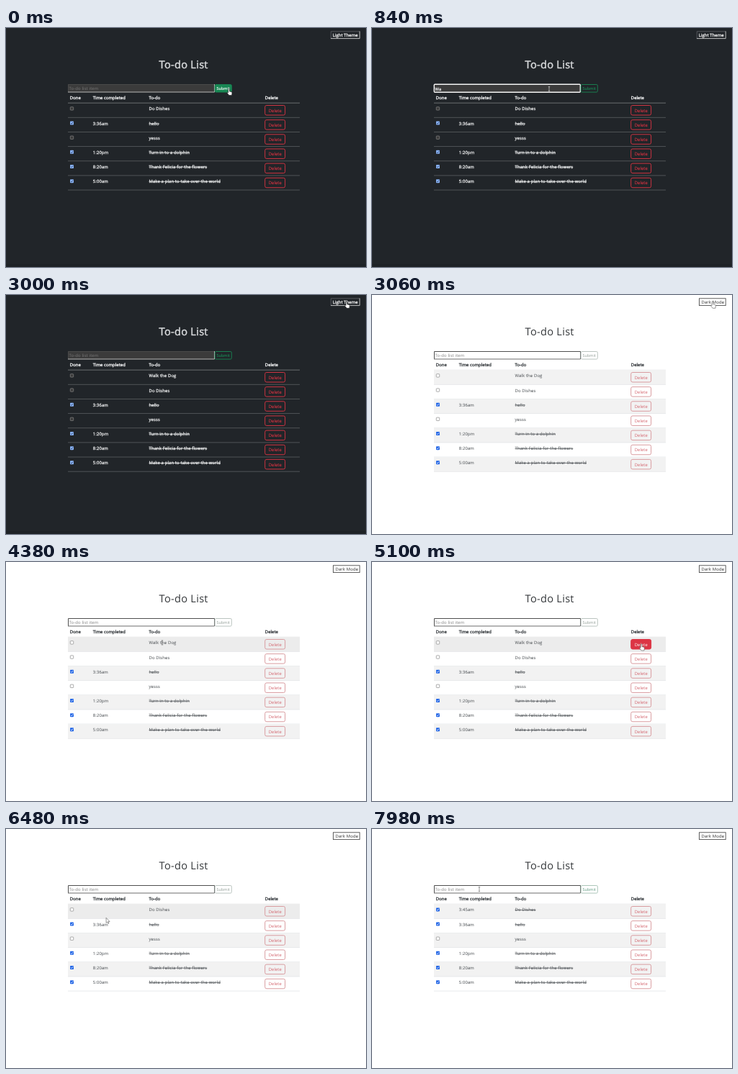
An HTML page for the animation above (8 s loop, 500 px wide and 332 px high).

```html
<!DOCTYPE html>
<html lang="en">
<head>
<meta charset="utf-8">
<title>To-do List</title>
<style>
  html, body { margin: 0; width: 100%; height: 100%; overflow: hidden; }
  svg { display: block; width: 500px; height: 332px; }
  text {
    font: 5.86px "Open Sans", "Noto Sans", sans-serif;
    letter-spacing: .15px;
    text-rendering: geometricPrecision;
    fill: var(--text);
    stroke: var(--text);
    stroke-width: var(--weight);
    white-space: pre;
  }
  .dark {
    --bg: #212529; --foot: #1e2226; --text: #e2e3e4; --head: #f0f1f2; --title: #d9dbdd;
    --line: #54585b; --rule: #707376; --weight: .3px; --thin: .15px;
    --field: #3b3b3b; --edge: #4a4a4a; --edge2: #b4b4b4; --hint: #767676;
    --box: #3b3b3b; --boxedge: #868686; --tick: #8ab4f8; --mark: #22324d;
    --red: #cc3341; --redtext: #cc3341; --green: #198754; --greentext: #198754;
    --theme: #f4f4f4; --beam: #d8d8d8; --outline: #15181a;
  }
  .light {
    --bg: #fff; --foot: #fff; --text: #53575b; --head: #3c4044; --title: #35383b;
    --line: #e6e8ea; --rule: #e6e8ea; --weight: .05px; --thin: 0px;
    --field: #fff; --edge: #505050; --edge2: #6c6c6c; --hint: #808080;
    --box: #fff; --boxedge: #8c8c8c; --tick: #2467e6; --mark: #fff;
    --red: #d99ca0; --redtext: #d3646d; --green: #b3beb8; --greentext: #8d9a93;
    --theme: #444; --beam: #666; --outline: #555;
  }
  .light.tinted { --green: #a3c0b1; --greentext: #559479; }
  .title { font-size: 14.6px; letter-spacing: .27px; fill: var(--title); stroke: none; }
  .dark .title { stroke: var(--title); stroke-width: .45px; }
  .head { fill: var(--head); stroke: var(--head); stroke-width: .35px; letter-spacing: .08px; }
  .hint { fill: var(--hint); stroke: none; }
  .theme { fill: var(--theme); stroke: var(--theme); }
  .dark .theme { letter-spacing: .1px; }
  .del { fill: var(--redtext); stroke: var(--redtext); stroke-width: var(--thin); letter-spacing: .05px; }
  .sub {
    fill: var(--greentext); stroke: var(--greentext); stroke-width: var(--thin);
    font-size: 5.4px; letter-spacing: .1px;
  }
  .on { fill: #fff; stroke: #fff; }
  .strike { stroke: var(--text); stroke-width: .75; }
</style>
</head>
<body>
<svg id="stage" viewBox="0 0 500 332"><g id="page"></g><path id="cursor"/></svg>
<script>
const stage = document.getElementById('stage');
const page = document.getElementById('page');
const cursor = document.getElementById('cursor');

const LOOP = 8000, STEP = 60;
const FOCUS = 660, ADD = 2340, LIGHT = 3060, REMOVE = 5220, CHECK = 6960, TINT = 7740;
const TOP = 104.4, ROW = 20.15;

const ITEM = 'Walk the Dog';
const KEYS = [720, 780, 960, 1020, 1080, 1080, 1140, 1200, 1500, 1560, 1680, 1740];

// time, x, y
const PATH = [
  [0, 309.6, 84.5], [60, 309.6, 84.5], [240, 348, 150], [420, 335, 200], [660, 246, 84.6],
  [2040, 246, 84.6], [2280, 302, 83], [2400, 302, 83], [2760, 462, 25], [2880, 473, 9.3],
  [3120, 473, 9.3], [3600, 350, 113], [3900, 76, 112], [4200, 217, 112], [4380, 217, 112],
  [5040, 374, 114], [5220, 374, 114], [5640, 324.5, 112.5], [6000, 250, 114],
  [6300, 170, 130], [6720, 91.5, 113], [7020, 91.5, 113], [7320, 368, 111],
  [7740, 302, 83], [7980, 149, 83.7], [8000, 149, 83.7]
];

const SHAPES = {
  arrow: 'M0 0V7.2L1.7 5.7 2.8 8.2 3.9 7.7 2.8 5.3H5Z',
  hand: 'M-.9.7a.9.9 0 0 1 1.8 0V3.6l2.6.6q1 .3.9 1.3L4 9H.2L-2.2 6q-.6-1.2.5-1.2L-.9 5.4Z',
  beam: 'M-1.2-3H1.2M0-3V3M-1.2 3H1.2'
};

const text = (x, y, s, cls = '') => `<text x="${x}" y="${y}" class="${cls}">${s}</text>`;
const rect = (x, y, w, h, fill, extra = '') =>
  `<rect x="${x}" y="${y}" width="${w}" height="${h}" fill="${fill}" ${extra}/>`;
const stroke = (d, color, w = 1) =>
  `<path d="${d}" fill="none" stroke="${color}" stroke-width="${w}"/>`;
const rule = (y, color) => rect(86, y - .7, 322, .9, color);
const within = (p, x0, y0, x1, y1) => p.x >= x0 && p.x <= x1 && p.y >= y0 && p.y <= y1;

function pointer(t) {
  const i = Math.max(1, PATH.findIndex(k => k[0] > t));
  const [t0, x0, y0] = PATH[i - 1], [t1, x1, y1] = PATH[i];
  const u = (t - t0) / (t1 - t0), e = u * u * (3 - 2 * u);
  return { x: x0 + (x1 - x0) * e, y: y0 + (y1 - y0) * e };
}

function todos(t) {
  const list = [
    [t >= CHECK ? '3:45am' : '', 'Do Dishes'],
    ['3:36am', 'hello'],
    ['', 'yesss'],
    ['1:20pm', 'Turn in to a dolphin'],
    ['8:20am', 'Thank Felicia for the flowers'],
    ['5:00am', 'Make a plan to take over the world']
  ];
  if (t >= ADD && t < REMOVE) list.unshift(['', ITEM]);
  return list;
}

// What lies under the pointer
function probe(p, list) {
  const hit = { shape: 'arrow', row: -1, del: false, submit: false };
  if (within(p, 450, 4, 492, 16)) hit.shape = 'hand';
  else if (within(p, 86, 78, 289.5, 90)) hit.shape = 'beam';
  else if (within(p, 289.5, 78, 314, 90)) { hit.shape = 'hand'; hit.submit = true; }
  const i = Math.floor((p.y - TOP) / ROW);
  if (i >= 0 && i < list.length && p.x >= 86 && p.x <= 408) {
    const y = TOP + ROW * i;
    hit.row = i;
    hit.del = within(p, 359.5, y + 3, 388, y + 17);
    if (hit.del) hit.shape = 'hand';
    else if (within(p, 198, y + 4, 198 + list[i][1].length * 3, y + 12)) hit.shape = 'beam';
  }
  return hit;
}

function checkbox(y, done) {
  if (!done) return rect(89.3, y, 4.4, 4.4, 'var(--box)', 'rx=".7" stroke="var(--boxedge)" stroke-width=".7"');
  return rect(89, y - .3, 5, 5, 'var(--tick)', 'rx=".8"') +
    stroke(`M90 ${y + 2.3}l1.1 1.1 2-2.4`, 'var(--mark)', .8);
}

function row([time, name], i, hit, dark) {
  const y = TOP + ROW * i, hover = hit.row === i, del = hover && hit.del;
  let s = '';
  if (!dark && (hover || i % 2 === 0)) s += rect(86, y, 322, ROW, hover ? '#ececec' : '#f2f2f2');
  s += rule(y + ROW, 'var(--line)');
  s += checkbox(y + 5.3, time) + text(120.7, y + 10, time) + text(198.5, y + 10, name, time && 'done');
  const by = y + 3.1;
  s += rect(359.7, by, 27.9, 13.5, del ? '#dc3545' : 'none',
    `rx="2.2" stroke="${del ? '#dc3545' : 'var(--red)'}" stroke-width="1"`);
  return s + text(364.8, by + 9.1, 'Delete', del ? 'del on' : 'del');
}

function form(t, hit) {
  const typed = t < ADD ? ITEM.slice(0, KEYS.filter(k => k <= t).length) : '';
  let s;
  if (t >= FOCUS && t < ADD) {
    s = rect(86.3, 78.3, 203, 10.9, 'var(--field)', 'rx="1" stroke="#f4f4f4" stroke-width="1.4"');
  } else {
    s = rect(86, 78, 204, 11.5, 'var(--field)') +
      stroke('M86.5 89V78.5H290', 'var(--edge)') + stroke('M86 89H289.5V78', 'var(--edge2)');
  }
  s += typed ? text(87.6, 86.5, typed) : text(87.6, 86.4, 'To-do list item', 'hint');
  s += rect(290.2, 78.5, 23.1, 10.6, hit.submit ? '#198754' : 'none',
    `rx="1.6" stroke="${hit.submit ? '#198754' : 'var(--green)'}" stroke-width=".9"`);
  return s + text(292.5, 85.8, 'Submit', hit.submit ? 'sub on' : 'sub');
}

function themeButton(dark) {
  if (!dark) return rect(454.5, 4.8, 36.7, 9.8, 'none', 'stroke="#4d4d4d" stroke-width=".9"') +
    text(457.5, 12.1, 'Dark Mode', 'theme');
  return stroke('M451.3 14.5V4.8H491', '#6b6e71', .7) + stroke('M451 14.6H491.2V4.5', '#d0d0d0', .9) +
    text(453.8, 11.9, 'Light Theme', 'theme');
}

function drawPage(t, list, hit) {
  const dark = t < LIGHT;
  stage.setAttribute('class', dark ? 'dark' : t >= TINT ? 'light tinted' : 'light');
  document.body.style.background = dark ? '#212529' : '#fff';
  page.innerHTML = rect(0, 0, 500, 332, 'var(--bg)') + rect(0, 328, 500, 4, 'var(--foot)') +
    themeButton(dark) + text(212.6, 56.2, 'To-do List', 'title') + form(t, hit) +
    text(88.8, 99.2, 'Done', 'head') + text(120.7, 99.2, 'Time completed', 'head') +
    text(198.5, 99.2, 'To-do', 'head') + text(359.8, 99.2, 'Delete', 'head') +
    rule(TOP, 'var(--rule)') +
    list.map((item, i) => row(item, i, hit, dark)).join('');
  for (const el of page.querySelectorAll('.done')) {
    const x = +el.getAttribute('x'), y = +el.getAttribute('y') - 1.8;
    el.insertAdjacentHTML('afterend',
      `<line class="strike" x1="${x}" x2="${x + el.getComputedTextLength()}" y1="${y}" y2="${y}"/>`);
  }
}

function drawCursor(p, shape) {
  const beam = shape === 'beam';
  cursor.setAttribute('d', SHAPES[shape]);
  cursor.setAttribute('transform', `translate(${p.x} ${p.y})`);
  cursor.setAttribute('style', beam
    ? 'fill:none;stroke:var(--beam);stroke-width:.7'
    : 'fill:#fff;stroke:var(--outline);stroke-width:.6;stroke-linejoin:round');
}

const start = performance.now();
let last = -1;

function frame() {
  const now = (performance.now() - start) % LOOP;
  const t = Math.floor(now / STEP) * STEP;
  if (t !== last) {
    last = t;
    const p = pointer(t), list = todos(t), hit = probe(p, list);
    drawPage(t, list, hit);
    drawCursor(p, hit.shape);
  }
  requestAnimationFrame(frame);
}
frame();
</script>
</body>
</html>
```
